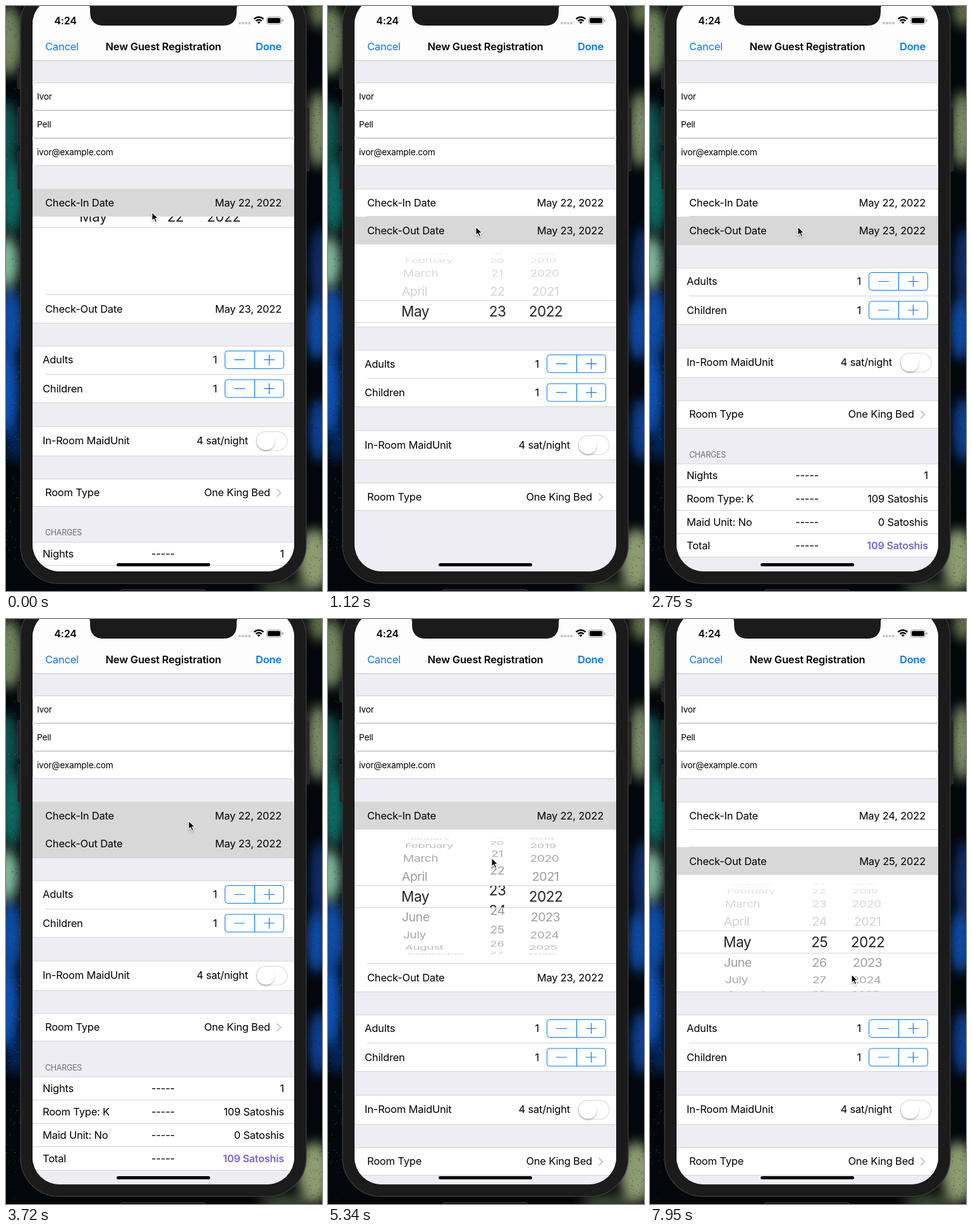
An HTML page that plays this animation: 500 px wide and 925 px high, repeating every 8 s.

```html
<!DOCTYPE html>
<html lang="en">
<head>
<meta charset="utf-8">
<title>Guest registration</title>
<style>
html, body { margin: 0; width: 100%; height: 100%; overflow: hidden; background: #000; }
svg { display: block; width: 500px; height: 925px; }
text { font-family: Inter, "Liberation Sans", sans-serif; letter-spacing: -0.2px; white-space: pre; }
.wheel text { letter-spacing: -0.5px; }
</style>
</head>
<body>
<script>
const LOOP = 8000, OPEN = 212, MOVE = 300;
const BLUE = '#007aff', LINE = '#d3d3d6', GRAY = '#eeedf3';
const MONTHS = ['January', 'February', 'March', 'April', 'May', 'June', 'July', 'August', 'September'];

// ---- SVG helpers ----
function el(parent, tag, attrs = {}) {
  const node = document.createElementNS('http://www.w3.org/2000/svg', tag);
  set(node, attrs);
  parent.appendChild(node);
  return node;
}
function set(node, attrs) {
  for (const k in attrs) node.setAttribute(k, attrs[k]);
}
const group = (parent, attrs) => el(parent, 'g', attrs);
const rect = (parent, x, y, width, height, fill, more = {}) =>
  el(parent, 'rect', { x, y, width, height, fill, ...more });
const path = (parent, d, stroke, width, more = {}) =>
  el(parent, 'path', { d, stroke, 'stroke-width': width, fill: 'none', ...more });
const hline = (parent, y, x = 42) => rect(parent, x, y, 456 - x, 1, LINE);
function label(parent, x, mid, str, o = {}) {
  const size = o.size || 16.5;
  const node = el(parent, 'text', {
    x, y: mid + size * 0.363, 'font-size': size, fill: o.fill || '#000',
    'text-anchor': o.anchor || 'start', 'font-weight': o.weight || 400
  });
  node.textContent = str;
  return node;
}
const right = (parent, x, mid, str, o = {}) => label(parent, x, mid, str, { ...o, anchor: 'end' });

const svg = el(document.body, 'svg', { viewBox: '0 0 500 925' });
const defs = el(svg, 'defs');
function clip(id, ...boxes) {
  const c = el(defs, 'clipPath', { id });
  return boxes.map(([x, y, width, height, rx = 0]) => el(c, 'rect', { x, y, width, height, rx }));
}
const blur = el(defs, 'filter', { id: 'soft', x: '-60%', y: '-60%', width: '220%', height: '220%' });
el(blur, 'feGaussianBlur', { stdDeviation: 9 });
const lift = el(defs, 'filter', { id: 'lift', x: '-40%', y: '-40%', width: '180%', height: '190%' });
el(lift, 'feDropShadow', { dx: 0, dy: 2, stdDeviation: 1.6, 'flood-opacity': 0.28 });

// ---- wallpaper ----
function drawWallpaper() {
  rect(svg, 0, 0, 500, 925, '#03060a');
  const clouds = [
    [4, 55, 22, 55, '#71855f'], [0, 200, 20, 50, '#0b5350'], [8, 300, 18, 60, '#0a6a63'],
    [2, 405, 18, 40, '#7fb89a'], [6, 500, 20, 55, '#0b4da6'], [2, 610, 18, 70, '#0a52b8'],
    [14, 690, 14, 30, '#06265a'], [496, 8, 16, 26, '#66744a'], [494, 195, 16, 60, '#82926a'],
    [498, 410, 16, 60, '#0a2f6c'], [492, 510, 16, 50, '#0b4fae'], [496, 670, 16, 50, '#0a429a'],
    [488, 875, 26, 48, '#8c9c70'], [440, 922, 40, 10, '#46543a']
  ];
  const sky = group(svg, { filter: 'url(#soft)' });
  for (const [cx, cy, rx, ry, fill] of clouds) el(sky, 'ellipse', { cx, cy, rx, ry, fill });
  let seed = 7;
  const rnd = () => (seed = (seed * 16807) % 2147483647) / 2147483647;
  const tints = ['#0a1418', '#5f7a3a', '#0c3a48', '#8f9a4a'];
  const dots = tints.map(() => '');
  for (let i = 0; i < 700; i++) {
    const x = rnd() * 24 + (i % 2 ? 476 : 0), y = rnd() * 925;
    dots[i % 4 ? 0 : 1 + Math.floor(rnd() * 3)] += `M${x.toFixed(1)} ${y.toFixed(1)}h1`;
  }
  dots.forEach((d, i) => path(svg, d, tints[i], 1, { opacity: 0.7 }));
}

// ---- phone ----
function drawBody() {
  for (const [x, y, w, h] of [[18, 98, 8, 33], [18, 160, 8, 60], [18, 230, 8, 60], [472, 160, 8, 101]])
    rect(svg, x, y, w, h, '#242425', { rx: 2, stroke: '#3a3a3b', 'stroke-width': 0.7 });
  rect(svg, 23, -33, 452, 946, '#1b1b1c', { rx: 61, stroke: '#39393a', 'stroke-width': 1.4 });
  rect(svg, 181, 922.5, 135, 20, '#171718', { rx: 4, stroke: '#3c3c3d' });
}

function drawTop(p) {
  rect(p, 42, -14, 414, 100, '#fdfdfd');
  rect(p, 42, 86, 414, 1, '#c4c4c8');
  label(p, 94, 23, '4:24', { anchor: 'middle', weight: 600, size: 16 });
  for (let i = 0; i < 4; i++) rect(p, 368 + i * 5, 25, 4, 4, '#c9c9cc', { rx: 1.5 });
  path(p, 'M392.5 20.5Q400 14.5 407.5 20.5M395.3 23.6Q400 19.8 404.7 23.6', '#000', 2.3);
  el(p, 'path', { d: 'M397.4 25.5Q400 23.4 402.6 25.5L400 28.3Z' });
  rect(p, 412.5, 17.5, 23, 11, 'none', { rx: 3, stroke: '#8d8d8d' });
  rect(p, 414, 19, 20, 8, '#000', { rx: 1.8 });
  rect(p, 437, 21, 1.5, 4, '#8d8d8d', { rx: 0.7 });
  label(p, 62, 64, 'Cancel', { fill: BLUE });
  label(p, 249, 64, 'New Guest Registration', { anchor: 'middle', weight: 600 });
  right(p, 436, 64, 'Done', { fill: BLUE, weight: 600 });
  el(p, 'path', { fill: '#1b1b1c', d: 'M126 -2Q133 -2 133 4V9Q133 31 155 31H343Q365 31 365 9V4Q365 -2 372 -2Z' });
}

function drawFields(p) {
  rect(p, 42, 121, 414, 132, '#fff');
  ['Ivor', 'Pell', 'ivor@example.com'].forEach((str, i) => {
    const y = 121.5 + i * 44;
    rect(p, 42.5, y, 413, 43, '#fff', { rx: 5, stroke: '#cfcfcf' });
    if (i < 2) rect(p, 62, y + 43, 394, 1, '#c3c3c6');
    label(p, 49, y + 21.5, str, { size: 13.7 });
  });
}

function card(p, top, bottom) {
  rect(p, 42, top, 414, bottom - top, '#fff');
  hline(p, top - 0.5);
  hline(p, bottom);
}

function stepper(p, mid) {
  rect(p, 346.5, mid - 14, 93, 28, '#fff', { rx: 4, stroke: BLUE });
  path(p, `M393.5 ${mid - 14}v28M361 ${mid}h17M408 ${mid}h17M416.5 ${mid - 8.5}v17`, BLUE, 1.2);
}

function drawLower(p) {
  rect(p, 42, 377, 414, 700, GRAY);
  hline(p, 377);
  card(p, 414, 503);
  hline(p, 458, 62);
  [['Adults', 435.5], ['Children', 481]].forEach(([str, mid]) => {
    label(p, 58, mid, str);
    right(p, 334, mid, '1');
    stepper(p, mid);
  });
  card(p, 541, 587);
  label(p, 58, 563.5, 'In-Room MaidUnit');
  right(p, 383, 563.5, '4 sat/night');
  rect(p, 396, 549, 49, 30, '#fff', { rx: 15, stroke: '#e3e3e5', 'stroke-width': 1.5 });
  el(p, 'circle', { cx: 411, cy: 564, r: 14, fill: '#fff', filter: 'url(#lift)' });
  card(p, 624, 667);
  label(p, 62, 645.5, 'Room Type');
  right(p, 418, 645.5, 'One King Bed');
  path(p, 'M428.5 640l6 6l-6 6', '#c4c4c9', 1.8);
}

function drawCharges(p) {
  label(p, 62, 709, 'CHARGES', { size: 12.4, fill: '#6d6d72' });
  card(p, 724, 871);
  const rows = [['Nights', '1'], ['Room Type: K', '109 Satoshis'], ['Maid Unit: No', '0 Satoshis'], ['Total', '109 Satoshis']];
  rows.forEach(([name, value], i) => {
    const mid = 742 + i * 37;
    label(p, 58, mid, name);
    label(p, 230, mid, '-----');
    right(p, 440, mid, value, i === 3 ? { fill: '#7765dc', weight: 600, size: 16.2 } : {});
    if (i) hline(p, mid - 19);
  });
}

function dateRow(p, y, name) {
  const g = group(p);
  const mark = rect(g, 42, y, 414, 44, '#d8d8d8');
  label(g, 62, y + 22, name);
  return { g, mark, value: right(g, 436, y + 22, '') };
}

drawWallpaper();
drawBody();
clip('screen', [42, -14, 414, 908, 43]);
const gapBox = clip('gap', [42, 333, 414, 0])[0];
clip('band', [42, -17, 414, 35]);
clip('rim', [42, -106, 414, 89], [42, 18, 414, 88]);

const screen = group(svg, { 'clip-path': 'url(#screen)' });
rect(screen, 42, -14, 414, 908, GRAY);
drawFields(screen);
const dates = rect(screen, 42, 290, 414, 87, '#fff');
hline(screen, 289);
hline(screen, 332, 62);
const gap = group(screen, { 'clip-path': 'url(#gap)' });
const wheel = group(gap, { class: 'wheel' });
const split = hline(screen, 332, 62);
const rowIn = dateRow(screen, 289, 'Check-In Date');
const rowOut = dateRow(screen, 333, 'Check-Out Date');
const lower = group(screen);
drawLower(lower);
const charges = group(lower);
drawCharges(charges);
drawTop(screen);
rect(screen, 175, 881, 148, 5, '#000', { rx: 2.5 });

const cursor = el(svg, 'path', {
  d: 'M0 0V13.4L3.1 10.6L5.3 15.8L7.7 14.8L5.5 9.7H9.7Z',
  fill: '#000', stroke: '#fff', 'stroke-width': 1.1, 'stroke-linejoin': 'round', filter: 'url(#lift)'
});

// ---- date wheel ----
const rim = group(wheel, { 'clip-path': 'url(#rim)' });
const band = group(wheel, { 'clip-path': 'url(#band)' });
hline(wheel, -18);
hline(wheel, 17);
const columns = [
  { x: 116, anchor: 'start', at: n => MONTHS[n] || '' },
  { x: 268, anchor: 'middle', at: n => String(n) },
  { x: 344.5, anchor: 'middle', at: n => String(n) }
];
for (const c of columns) {
  c.outer = []; c.inner = [];
  for (let k = -4; k <= 4; k++) c.outer.push(label(rim, c.x, 0, '', { size: 19.8, anchor: c.anchor }));
  for (let k = -1; k <= 1; k++) c.inner.push(label(band, c.x, 0, '', { size: 22.6, anchor: c.anchor, fill: '#262626' }));
}

function turn(c, value, above, below) {
  const base = Math.round(value);
  c.outer.forEach((node, i) => {
    const n = base + i - 4, a = (n - value) * 0.356, flat = Math.cos(a);
    const sx = 1 - 0.085 * (1 - flat);
    node.textContent = c.at(n);
    set(node, {
      transform: `translate(${249 * (1 - sx)} ${92 * Math.sin(a)}) scale(${sx} ${Math.max(flat, 0.01)})`,
      opacity: flat < 0.03 ? 0 : (0.14 + 0.26 * flat) * (a < 0 ? above : below)
    });
  });
  c.inner.forEach((node, i) => {
    const n = base + i - 1;
    node.textContent = c.at(n);
    set(node, { transform: `translate(0 ${(n - value) * 32})` });
  });
}

// ---- timing ----
// Bursts of screen updates: start, end, number of updates
const BURSTS = [
  [60, 330, 5], [510, 740, 5], [920, 1320, 7], [2160, 2510, 5], [2750, 3120, 7], [3720, 4480, 12],
  [4540, 4710, 4], [4860, 5620, 14], [5710, 5820, 3], [6420, 6480, 2], [6830, 7010, 4],
  [7190, 7480, 5], [7660, 7950, 4]
];
const POINTER = [
  [0, 231, 326], [330, 231, 334], [510, 231, 334], [740, 234, 349], [2750, 234, 349], [3120, 289, 319],
  [4000, 289, 319], [4480, 299, 437], [4540, 299, 437], [4710, 272, 430], [4860, 272, 430],
  [5327, 259, 378], [5620, 258, 365], [6830, 258, 365], [7010, 319, 548], [7190, 319, 548], [7480, 319, 562]
];
const CLOSE_IN = -133, OPEN_OUT = 947, CLOSE_OUT = 2143, OPEN_IN = 3780, SWAP = 7718;

function snap(t) {
  let last = 0;
  for (const [a, b, n] of BURSTS) {
    if (t < a) return last;
    const step = (b - a) / (n - 1);
    if (t < b) return a + Math.floor((t - a) / step + 1e-6) * step;
    last = b;
  }
  return last;
}
const clamp = v => Math.min(1, Math.max(0, v));
const ease = (t, start) => {
  const p = clamp((t - start) / MOVE);
  return p * p * (3 - 2 * p);
};
function pointer(t) {
  const i = POINTER.findIndex(p => p[0] > t);
  if (i < 0) return POINTER[POINTER.length - 1].slice(1);
  const [a, ax, ay] = POINTER[i - 1], [b, bx, by] = POINTER[i];
  const p = (t - a) / (b - a);
  return [ax + (bx - ax) * p, ay + (by - ay) * p];
}
function dayIn(t, y) {
  if (t < 4860) return 22;
  if (t < 5700) return 22 + Math.max(0, 430 - y - 10) / 32;
  return 23.72 + 0.28 * clamp((t - 5660) / 160);
}

function render(now) {
  const t = snap(now);
  const [px, py] = pointer(t);
  const openIn = OPEN * (1 - ease(t, CLOSE_IN) + ease(t, OPEN_IN) - ease(t, SWAP));
  const openOut = OPEN * (ease(t, OPEN_OUT) - ease(t, CLOSE_OUT) + ease(t, SWAP));
  const total = openIn + openOut;

  set(dates, { height: 87 + total });
  set(split, { transform: `translate(0 ${openIn})` });
  set(rowOut.g, { transform: `translate(0 ${openIn})` });
  set(lower, { transform: `translate(0 ${total})` });
  const shown = (node, on) => set(node, { visibility: on ? 'visible' : 'hidden' });
  shown(rowIn.mark, t < OPEN_OUT || (t >= 3720 && t < SWAP));
  shown(rowOut.mark, (t >= 920 && t < OPEN_IN) || t >= 7660);
  shown(charges, t < OPEN_OUT || (t > CLOSE_OUT && t < OPEN_IN));
  const changed = t >= 6420;
  rowIn.value.textContent = `May ${changed ? 24 : 22}, 2022`;
  rowOut.value.textContent = `May ${changed ? 25 : 23}, 2022`;

  // The wheel belongs to whichever date row is open
  const outside = (t >= OPEN_OUT && t < CLOSE_OUT) || t >= SWAP;
  const inside = t >= OPEN_IN && t < SWAP;
  const closing = t < 60;
  shown(gap, outside || inside || closing);
  const top = outside ? 377 + openIn : 333;
  set(gapBox, { y: top, height: Math.max(0, outside ? openOut : openIn) });
  set(wheel, { transform: `translate(0 ${closing ? 333 : top + 106})` });
  const start = t >= SWAP ? SWAP : inside ? OPEN_IN : OPEN_OUT;
  const above = closing ? 0 : 0.45 + 0.55 * clamp((t - start - 240) / 130);
  const below = closing ? 0 : 1;
  const day = outside ? (changed ? 25 : 23) : dayIn(t, py);
  [4, day, 2022].forEach((v, i) => turn(columns[i], v, above, below));

  set(cursor, { transform: `translate(${px} ${py})` });
}

function tick() {
  render(performance.now() % LOOP);
  requestAnimationFrame(tick);
}
tick();
</script>
</body>
</html>
```
